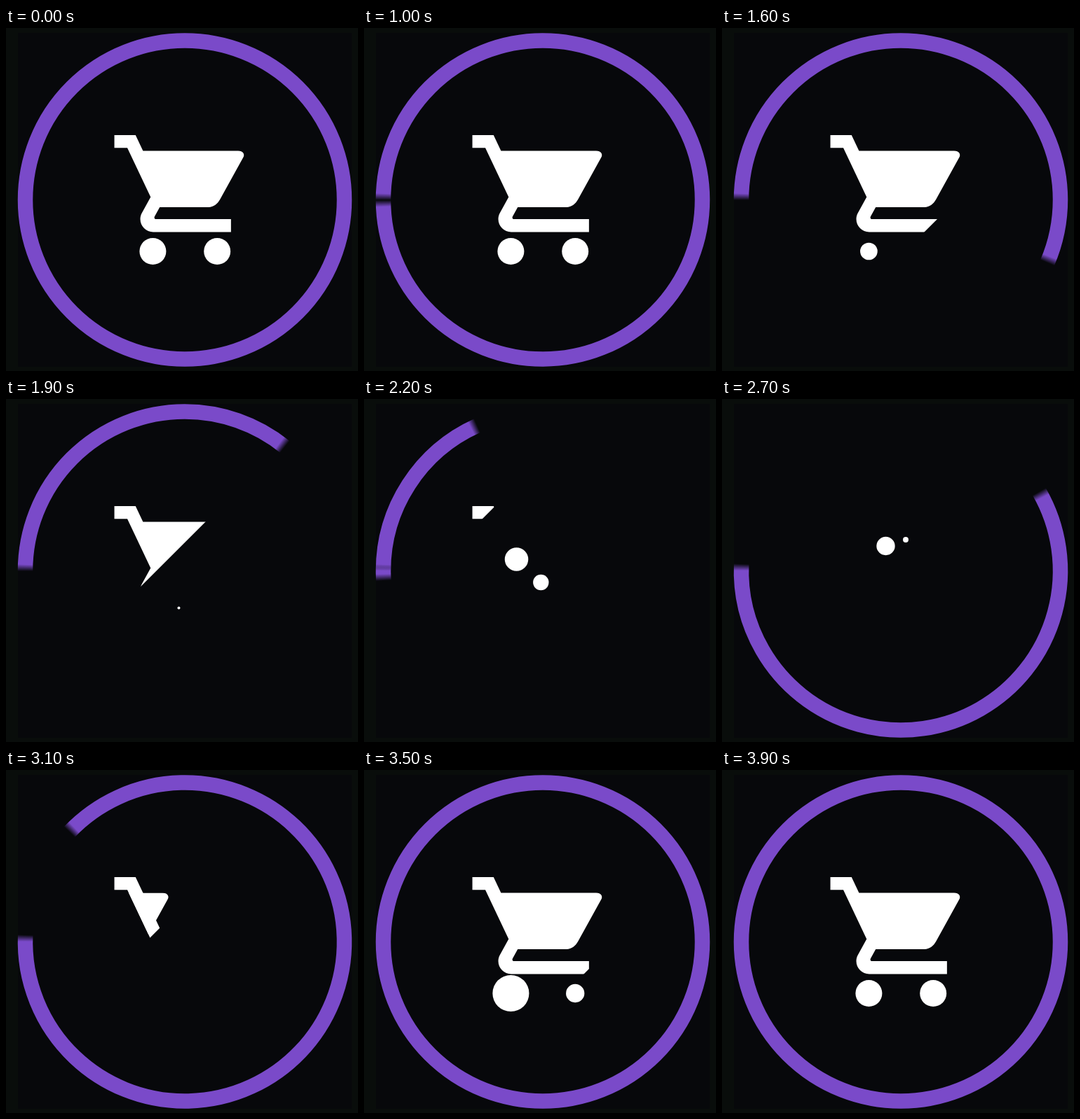
An HTML page with a canvas that plays this animation: 502x490 px, repeating every 4 s.

```html
<!DOCTYPE html>
<html lang="en">
<head>
<meta charset="utf-8">
<title>Cart loop</title>
<style>
html, body { margin: 0; width: 100%; height: 100%; overflow: hidden; background: #090d0b; }
canvas { display: block; filter: blur(.6px); }
</style>
</head>
<body>
<canvas id="stage" width="502" height="490"></canvas>
<script>
const ctx = document.getElementById('stage').getContext('2d');
const LOOP = 4000, STEP = 100, RAD = Math.PI / 180;
const RING = { x: 255, y: 245.5, r: 227.5, width: 21.5, base: 179.9, soft: 2.4, overlap: 2.6 };
const ICON = { x: 145.3, y: 134.4, scale: 9.24 };
const WHEEL = 19;
const PURPLE = '#7a4ac9';

const handle = 'M1 2v2h2l3.6 7.59-1.35 2.45c-.16.28-.25.61-.25.96 0 1.1.9 2 2 2h12v-2H7.42' +
  'c-.14 0-.25-.11-.25-.25l.03-.12.8-1.47';
const rightSide = 'c.75 0 1.1.55.78 1.04l-3.58 6.49c-.34.62-1 1.19-1.75 1.19';
const frame = new Path2D(handle + 'h1.55L5.42 4.44 4.27 2z');
const basket = inset => new Path2D(`M3 4.44H${20.1 - inset}${rightSide}H7z`);
const cart = new Path2D(handle + 'H15.55c.75 0 1.41-.57 1.75-1.19l3.58-6.49c.32-.49-.03-1.04-.78-1.04H5.42L4.27 2z');

const progress = (t, start, span) => Math.min(1, Math.max(0, (t - start) / span));
const easeOut = (x, power) => 1 - (1 - x) ** power;
const backOut = (x, c) => 1 + (c + 1) * (x - 1) ** 3 + c * (x - 1) ** 2;

function dot(x, y, r) {
  if (r <= 0) return;
  ctx.beginPath();
  ctx.arc(x, y, r, 0, Math.PI * 2);
  ctx.fill();
}

// Clockwise arc with softened ends
function arc(from, length) {
  const { x, y, r, soft } = RING;
  const end = Math.min(1, length / 360), fade = Math.min(soft / 360, end / 2);
  const paint = ctx.createConicGradient(from * RAD, x, y);
  paint.addColorStop(0, PURPLE + '00');
  paint.addColorStop(fade, PURPLE);
  paint.addColorStop(end - fade, PURPLE);
  paint.addColorStop(end, PURPLE + '00');
  ring(paint, from, end * 360);
}

function ring(paint, from, length) {
  ctx.strokeStyle = paint;
  ctx.lineWidth = RING.width;
  ctx.beginPath();
  ctx.arc(RING.x, RING.y, RING.r, from * RAD, (from + length) * RAD);
  ctx.stroke();
}

function drawRing(t) {
  if (t < 1000 || t >= 3500) return ring(PURPLE, 0, 360);
  const left = 360 * (1 - easeOut(progress(t, 1060, 1640), 1.43));
  const drawn = 360 * easeOut(progress(t, 2193, 1307), 1.78);
  if (left > 0) arc(RING.base, left);
  if (drawn > 0) arc(RING.base - drawn, drawn + RING.overlap);
}

// Diagonal wipe; on the way in, the right side of the basket slides out
function drawCart(t) {
  const entering = t > 2500;
  const limit = entering ? 305 + 0.4 * (t - 2750) : 612 - 0.4 * (t - 1520);
  const inset = entering ? Math.max(0, (3450 - t) / 30) : 0;
  ctx.save();
  ctx.beginPath();
  ctx.moveTo(0, 0);
  ctx.lineTo(Math.max(0, limit), 0);
  ctx.lineTo(0, Math.max(0, limit));
  ctx.clip();
  ctx.translate(ICON.x, ICON.y);
  ctx.scale(ICON.scale, ICON.scale);
  if (inset > 0) {
    ctx.fill(frame);
    ctx.clip(cart);
    ctx.fill(basket(inset));
  } else {
    ctx.fill(cart);
  }
  ctx.restore();
}

function drawWheel(t, x, shrinkAt, popAt) {
  const size = t < popAt
    ? 1 - progress(t, shrinkAt, 300)
    : backOut(progress(t, popAt, 450), 4.5);
  dot(x, 319, WHEEL * size);
}

// Dot that drifts on a line while it swells and fades away
function drawDrop(t, start, end, x, y, vx, vy, r) {
  const dt = t - 2200;
  dot(x + vx * dt, y + vy * dt, r * Math.sin(Math.PI * progress(t, start, end - start)));
}

function draw(t) {
  ctx.fillStyle = '#090d0b';
  ctx.fillRect(0, 0, 502, 490);
  ctx.fillStyle = '#07080b';
  ctx.fillRect(17, 7, 476, 477);
  drawRing(t);

  ctx.fillStyle = '#fff';
  drawCart(t);
  drawWheel(t, 209.4, 1495, 3350);
  drawWheel(t, 301.2, 1300, 3450);
  drawDrop(t, 1900, 2920, 217.5, 229, 0.032, -0.038, 21);
  drawDrop(t, 1850, 2800, 252.3, 262, 0.0194, -0.122, 12.2);
}

const start = performance.now();
function tick() {
  const t = Math.max(0, performance.now() - start) % LOOP;
  draw(Math.floor(t / STEP) * STEP);
  requestAnimationFrame(tick);
}
tick();
</script>
</body>
</html>
```
